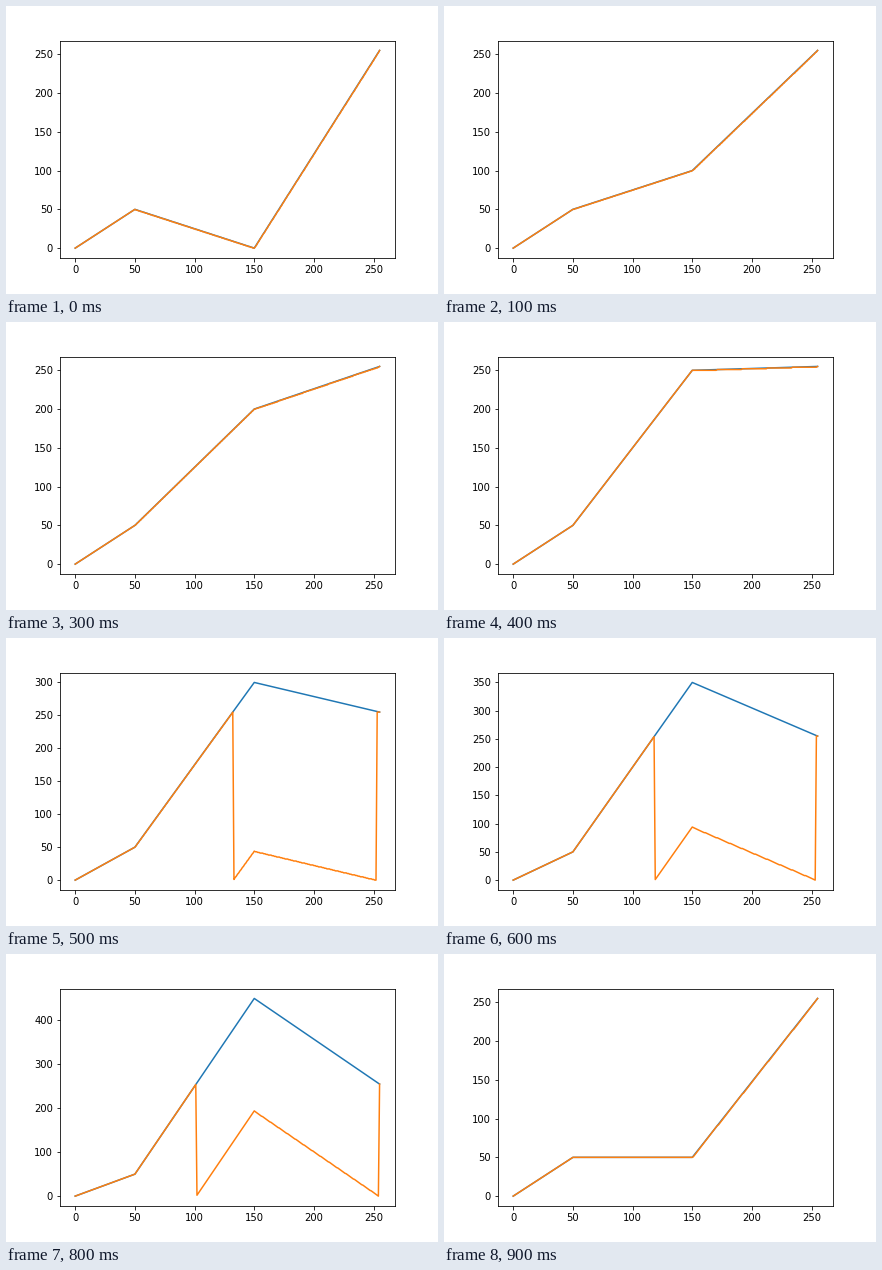
Animation of 432 by 288 pixels, one loop 1 s. Source, as a matplotlib script:

```python
import matplotlib.pyplot as plt
import numpy as np
from matplotlib.animation import FuncAnimation

INTERVAL = 100
# Heights of the knee at x = 150, in order of their names as text.
KNEES = sorted(range(0, 451, 50), key=str)

plt.rcParams["font.family"] = "DejaVu Sans"
fig, ax = plt.subplots(figsize=(6, 4), dpi=72, facecolor="white")
fig.subplots_adjust(left=0.125, right=0.9, bottom=0.125, top=0.88)

levels = np.arange(256)


def draw(frame):
    curve = np.interp(levels, [0, 50, 150, 255], [0, 50, KNEES[frame], 255])
    wrapped = np.floor(curve) % 256  # 8-bit overflow
    ax.clear()
    return ax.plot(levels, curve, "C0", levels, wrapped, "C1", linewidth=1.5)


animation = FuncAnimation(fig, draw, frames=len(KNEES), interval=INTERVAL,
                          repeat=True, repeat_delay=0, blit=False)
plt.show()
```
